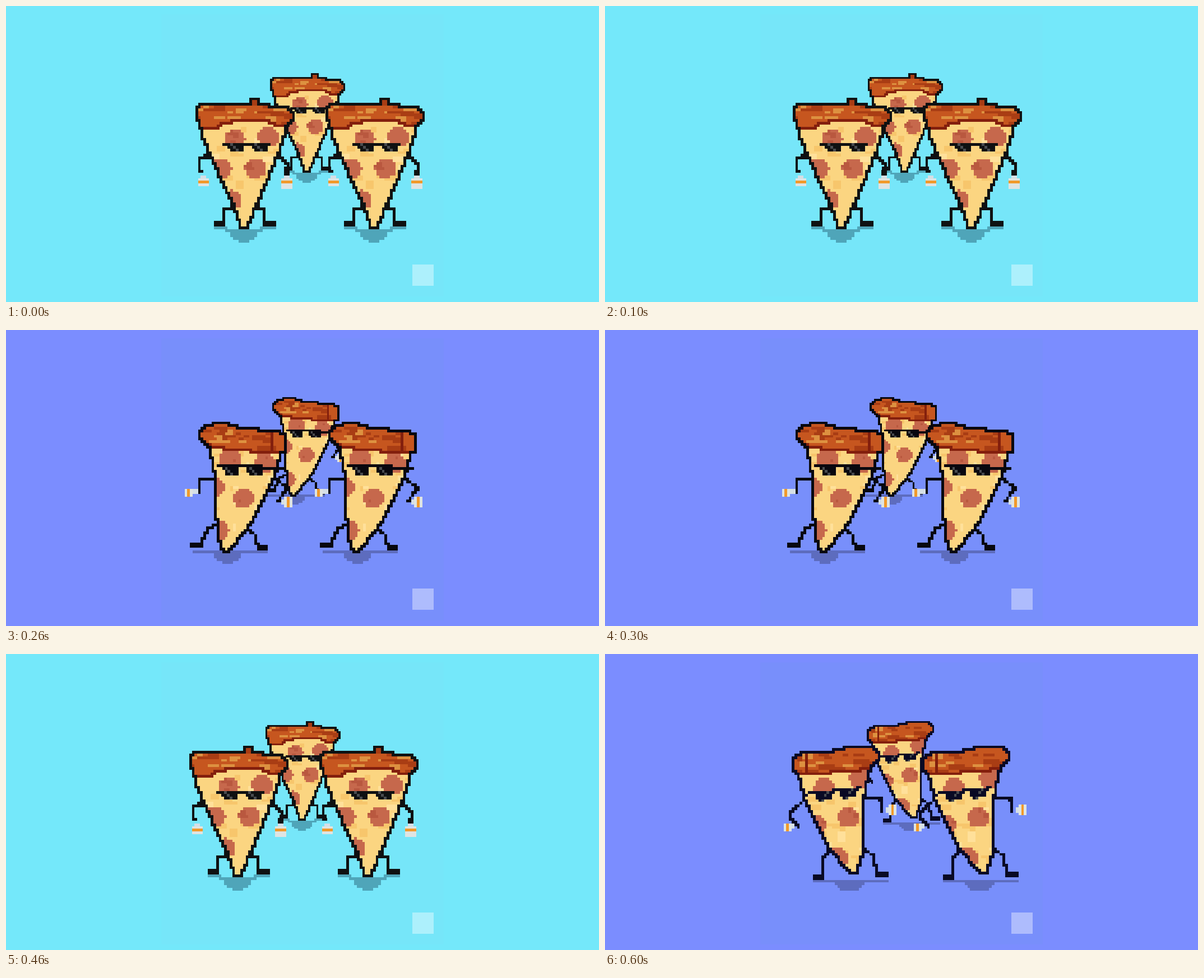
These frames come from a looping animation (1058x529 px, 700 ms). An HTML page with a canvas:

```html
<!DOCTYPE html>
<html lang="en">
<head>
<meta charset="utf-8">
<title>Dancing pizza slices</title>
<style>
  html, body { margin: 0; width: 100%; height: 100%; overflow: hidden; background: #74e8fa; }
  canvas { display: block; }
</style>
</head>
<body>
<canvas id="stage" width="1058" height="529"></canvas>
<script>
const CELL = 4.8, COLS = 46, ROWS = 58, LEFT = 309, TOP = 154;
const CHEESE = '#fbd581', CRUST = '#c6561f', PEPPERONI = '#c6684c';

const CYAN = { outer: '#74e8fa', inner: '#76e6f9', shadow: '#4fa5b9', ink: '#0f1112' };
const VIOLET = { outer: '#7b8dff', inner: '#788ffb', shadow: '#5d6cbe', ink: '#08080f' };

const points = text => text.split(' ').map(p => p.split(',').map(Number));
const mirror = list => list.map(([x, y]) => [835 - x, y - 3]);

const WEDGE = {
  crust: points('337,182 346,173 433,173 434,166 452,166 453,173 505,180 517,188 517,200 505,216 480,217 465,208 425,206 390,212 380,220 344,220 337,200'),
  body: points('345,195 349,238 378,305 404,360 417,399 433,399 448,362 471,308 498,240 504,195')
};
const SKEW = {
  crust: points('343,182 352,170 368,165 398,165 422,173 490,179 503,186 503,200 499,219 444,221 424,216 396,216 358,208 343,193'),
  body: points('356,195 371,262 375,372 385,399 399,399 437,352 480,270 499,195'),
  seam: points('476,182 476,217')
};
const SKEW_BACK = Object.fromEntries(Object.entries(SKEW).map(([k, v]) => [k, mirror(v)]));

// Key points on the stage for the front left slice; limbs run left then right.
const POSES = {
  front: {
    theme: CYAN, shape: WEDGE, seed: 7, upright: true,
    toppings: points('408,239 468,234 384,290 445,290 402,347'),
    bar: points('389,246 471,246'),
    arms: ['363,269 347,270 345,293 352,298', '488,269 503,285 501,300'],
    legs: ['404,359 390,365 389,388', '448,359 461,365 462,388'],
    shade: '372,394 390,395 398,403 452,403 460,395 478,394', pool: [425, 404]
  },
  lean: {
    theme: VIOLET, shape: SKEW, seed: 19,
    toppings: points('400,230 462,238 371,281 424,301 379,357'),
    bar: points('380,242 492,247'),
    arms: ['371,265 347,266 346,290', '484,268 503,284 484,307'],
    legs: ['373,349 359,356 348,384', '430,355 444,366 451,390'],
    shade: '338,397 466,397', pool: [394, 399]
  },
  back: {
    theme: { ...VIOLET, ink: '#090a24' }, shape: SKEW_BACK, seed: 31,
    toppings: points('392,239 454,222 376,305 434,292 416,364'),
    bar: points('456,240 352,251'),
    arms: ['350,267 331,283 332,296 345,309', '466,257 491,258 494,280'],
    legs: ['402,350 390,364 388,398', '464,350 477,359 486,393'],
    shade: '372,405 502,405', pool: [436, 407]
  }
};

// One beat of the dance per step: pose and camera drift.
const STEP = 100;
const BEATS = [
  ['front', 0], ['front', -3], ['lean', 0], ['lean', -3],
  ['front', -11], ['back', 0], ['back', 0]
];

// Shapes are tests that tell whether a point lies inside.
const box = (cx, cy, w, h) => (x, y) => Math.abs(x - cx) < w / 2 && Math.abs(y - cy) < h / 2;
const disc = (cx, cy, rx, ry) => (x, y) => Math.hypot((x - cx) / rx, (y - cy) / ry) <= 1;

const polygon = list => (x, y) => {
  let hit = false;
  list.forEach(([ax, ay], i) => {
    const [bx, by] = list[(i || list.length) - 1];
    if ((ay > y) !== (by > y) && x < (bx - ax) * (y - ay) / (by - ay) + ax) hit = !hit;
  });
  return hit;
};

const line = (list, r) => (x, y) => list.some(([bx, by], i) => {
  if (!i) return false;
  const [ax, ay] = list[i - 1], dx = bx - ax, dy = by - ay;
  const t = ((x - ax) * dx + (y - ay) * dy) / (dx * dx + dy * dy);
  const k = Math.max(0, Math.min(1, t));
  return Math.hypot(x - ax - k * dx, y - ay - k * dy) <= r;
});

// Cells of a shape that touch its outside.
const rim = test => (x, y) => {
  if (!test(x, y)) return false;
  for (let n = 0; n < 9; n++) {
    if (!test(x + (n % 3 - 1) * CELL, y + (Math.floor(n / 3) - 1) * CELL)) return true;
  }
  return false;
};

function random(seed) {
  return () => (seed = seed * 16807 % 2147483647) / 2147483647;
}

function buildSprite(pose) {
  const grid = new Array(COLS * ROWS).fill(null);
  const { theme, shape } = pose;
  const { ink } = theme;
  const rand = random(pose.seed);

  function paint(test, color, over) {
    grid.forEach((old, i) => {
      if (over && old !== over) return;
      const x = LEFT + (i % COLS + 0.5) * CELL;
      const y = TOP + (Math.floor(i / COLS) + 0.5) * CELL;
      if (test(x, y)) grid[i] = color;
    });
  }

  function speckle(base, color, count, w, h, top, bottom) {
    for (let n = 0; n < count; n++) {
      const x = 335 + rand() * 180, y = top + rand() * (bottom - top);
      paint(box(x, y, w * (0.5 + rand()), h * (0.5 + rand())), color, base);
    }
  }

  function bottle([x, y], side) {
    const cx = pose.upright ? x : x + side * 20;
    const cy = pose.upright ? y + 16 : y;
    paint(box((x + cx) / 2, (y + cy) / 2, 9, 9), '#d5dfe6');
    paint(box(cx, cy, 17, 17), '#dfe4e2');
    paint(pose.upright ? box(cx, cy, 17, 6) : box(cx, cy, 6, 17), '#f19a2b');
  }

  function sunglasses([a, b]) {
    const way = Math.sign(b[0] - a[0]), slope = (b[1] - a[1]) / (b[0] - a[0]);
    paint(line([a, b], 2.6), ink);
    for (const start of [3, 46]) {
      const x = a[0] + way * start, y = a[1] + way * start * slope;
      const at = (dx, dy) => [x + way * dx, y + dy + way * dx * slope];
      paint(polygon([at(0, -2), at(36, -2), at(30, 15), at(9, 15)]), ink);
      for (let n = 0; n < 3; n++) {
        paint(box(...at(12 + n * CELL, 3 + n * CELL), CELL, CELL), '#494c50', ink);
      }
    }
  }

  const body = polygon(shape.body), crust = polygon(shape.crust);
  const limbs = [...pose.arms, ...pose.legs].map(points);

  paint(line(points(pose.shade), 2.8), theme.shadow);
  paint((x, y) => y > pose.pool[1] - 2 && disc(...pose.pool, 25, 18)(x, y), theme.shadow);
  limbs.forEach((limb, i) => {
    const [x, y] = limb[limb.length - 1];
    paint(line(limb, 3), ink);
    if (i > 1) paint(box(x + (i === 2 ? -8 : 8), y, 21, 9), ink);
  });

  paint(body, CHEESE);
  pose.toppings.forEach(([x, y]) => paint(disc(x, y, 19, 18), PEPPERONI, CHEESE));
  speckle(CHEESE, '#f7c66c', 36, 16, 8, 215, 390);
  speckle(CHEESE, '#ffe09a', 16, 12, 8, 215, 390);
  speckle(PEPPERONI, '#b9583f', 30, 8, 6, 215, 370);

  paint(crust, CRUST);
  speckle(CRUST, '#a93d14', 18, 18, 7, 172, 216);
  speckle(CRUST, '#dd9140', 13, 16, 6, 182, 202);
  paint(rim(crust), '#831f0d');
  if (shape.seam) paint(line(shape.seam, 2.5), '#831f0d');
  paint(rim((x, y) => body(x, y) || crust(x, y)), ink);

  sunglasses(pose.bar);
  limbs.slice(0, 2).forEach((arm, i) => bottle(arm[arm.length - 1], i ? 1 : -1));

  const sprite = document.createElement('canvas');
  sprite.width = COLS;
  sprite.height = ROWS;
  const g = sprite.getContext('2d');
  grid.forEach((color, i) => {
    if (!color) return;
    g.fillStyle = color;
    g.fillRect(i % COLS, Math.floor(i / COLS), 1, 1);
  });
  return sprite;
}

const sprites = {};
for (const name in POSES) sprites[name] = buildSprite(POSES[name]);

const ctx = document.getElementById('stage').getContext('2d');

function block(color, x, y, w, h) {
  ctx.fillStyle = color;
  ctx.fillRect(x, y, w, h);
}

// Places the slice so that its tip stands at x, y.
function slice(sprite, drift, x, y, scale) {
  ctx.drawImage(sprite, x + (LEFT + drift - 425) * scale, y + (TOP - 398) * scale,
    COLS * CELL * scale, ROWS * CELL * scale);
}

function draw(time) {
  const [name, drift] = BEATS[Math.floor(time / STEP) % BEATS.length];
  const { theme } = POSES[name];
  const sprite = sprites[name];

  block(theme.outer, 0, 0, 1058, 529);
  block(theme.inner, 277, 15, 504, 504);
  ctx.imageSmoothingEnabled = false;
  slice(sprite, drift, 537, 297, 0.757);
  slice(sprite, drift, 425, 398, 1);
  slice(sprite, drift, 657, 398, 1);
  block('rgba(255,255,255,0.4)', 725, 462, 38, 38);
}

const start = performance.now();
function tick() {
  draw(performance.now() - start);
  requestAnimationFrame(tick);
}
tick();
</script>
</body>
</html>
```
